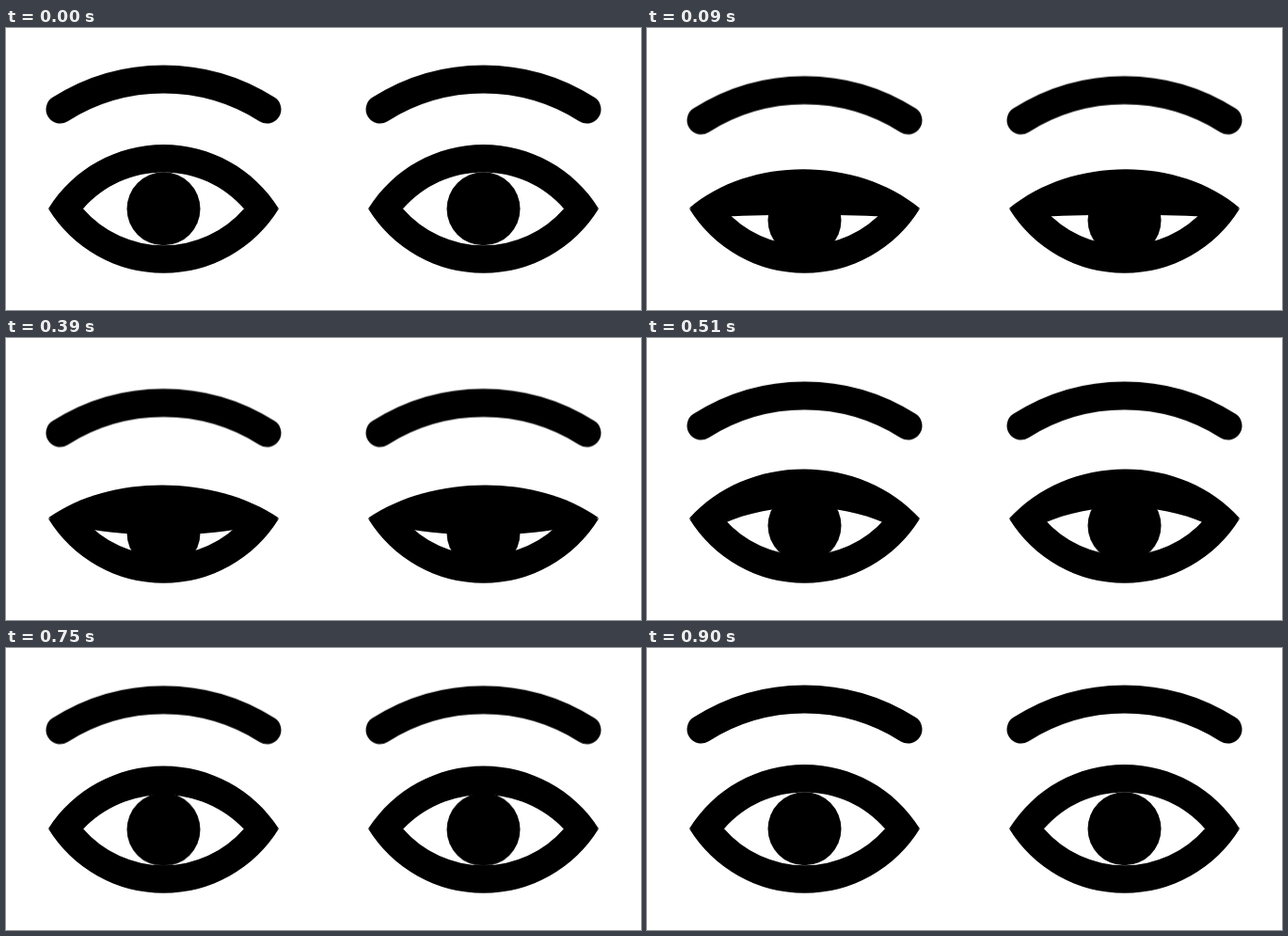
Animation, 675 px wide and 300 px high, one loop 2.7 s. Source, as an HTML page without scripts:

```html
<!DOCTYPE html>
<html lang="en">
<head>
<meta charset="utf-8">
<title>Blink</title>
<style>
  html, body { margin: 0; width: 100%; height: 100%; overflow: hidden; background: #fff; }
  svg { display: block; width: 100%; height: 100%; }

  :root {
    --snap: cubic-bezier(.08, 1, .2, 1);
    --reopen: cubic-bezier(.1, 0, .785, 0);
  }
  .brow {
    d: path("M57.5 86.5A205 205 0 0 1 277.5 86.5");
    fill: none; stroke: #000; stroke-width: 30; stroke-linecap: round;
    animation: brow 2.7s infinite;
  }
  .under { d: path("M45 192.3A143.8 143.8 0 0 0 290 192.3H253A113.2 113.2 0 0 1 82 192.3Z"); }
  /* hides the hairline where lid and lower rim meet */
  .seam { d: path("M47 192.3H81.5M253.5 192.3H288"); stroke: #000; stroke-width: 1.5; }
  .pupil { cx: 167.5px; cy: 192.3px; r: 39px; animation: pupil 2.7s infinite; }
  .lid { animation: lid 2.7s infinite; }

  /* shut at 270 ms, open again at 900 ms */
  @keyframes brow {
    0% { transform: translateY(0); animation-timing-function: var(--snap); }
    10% { transform: translateY(20px); animation-timing-function: var(--reopen); }
    33.333%, 100% { transform: translateY(0); }
  }
  @keyframes pupil {
    0% { transform: translateY(0); animation-timing-function: var(--snap); }
    10% { transform: translateY(21px); animation-timing-function: var(--reopen); }
    33.333%, 100% { transform: translateY(0); }
  }
  @keyframes lid {
    0%, 33.333%, 100% {
      d: path("M45 192.3C71.2 149.8 117.6 124 167.5 124C217.4 124 263.8 149.8 290 192.3L253 192.3C231.5 167.5 200.3 153.5 167.5 153.5C134.7 153.5 103.5 167.5 82 192.3Z");
      animation-timing-function: var(--snap);
    }
    10% {
      d: path("M45 191C82 174 124 169 165 169C208 169 252 175 290 191.3L253 206C224.5 222.7 196 231 167.5 231C139 231 110.5 222.7 82 206Z");
      animation-timing-function: var(--reopen);
    }
  }
</style>
</head>
<body>
<svg viewBox="0 0 675 300">
  <g>
    <path class="brow"/>
    <path class="under"/>
    <path class="seam"/>
    <circle class="pupil"/>
    <path class="lid"/>
  </g>
  <g transform="translate(675) scale(-1 1)">
    <path class="brow"/>
    <path class="under"/>
    <path class="seam"/>
    <circle class="pupil"/>
    <path class="lid"/>
  </g>
</svg>
</body>
</html>
```
